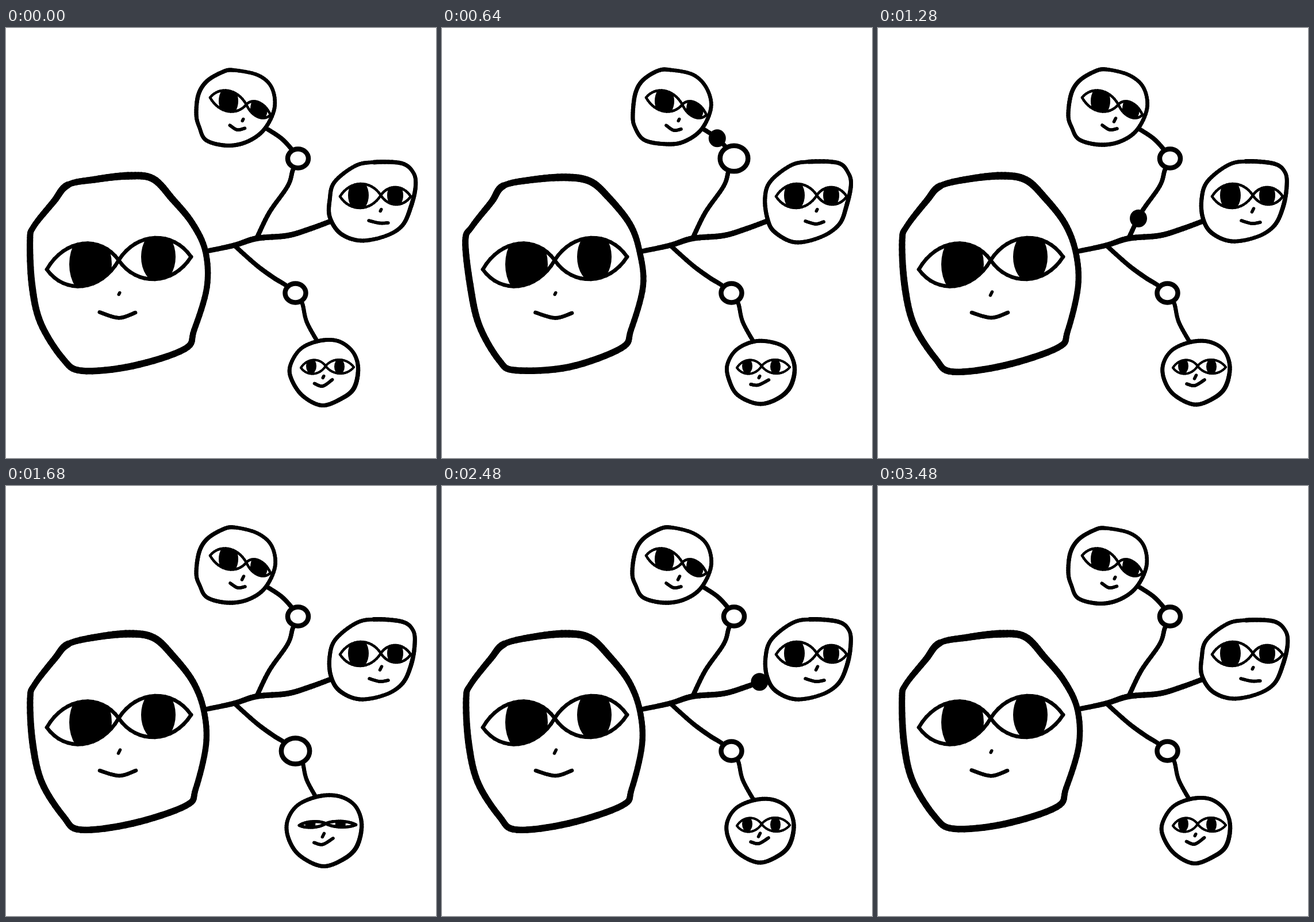
Animation, 748 px wide and 748 px high, one loop 3520 ms. Source, as an HTML page with a canvas:

```html
<!DOCTYPE html>
<html lang="en">
<head>
<meta charset="utf-8">
<title>Connected faces</title>
<style>
html, body { margin: 0; width: 100%; height: 100%; overflow: hidden; background: #fff; }
canvas { display: block; }
</style>
</head>
<body>
<canvas id="stage" width="748" height="748"></canvas>
<script>
const ctx = document.getElementById('stage').getContext('2d');
const LOOP = 3520, STEP = 40, HOLD = 160;
const WOBBLE = 'ABBBCBC'; // B is the steady drawing, A and C are shaky redraws

const pts = text => text.split(' ').map(p => p.split(',').map(Number));
const flip = a => [...a].reverse();
const lerp = (a, b, k) => a + (b - a) * k;

// seeded noise in -1..1
function noise(seed) {
  const v = Math.sin(seed * 127.1 + 31.7) * 43758.5453;
  return (v - Math.floor(v)) * 2 - 1;
}

function shake(line, look, amp, seed) {
  if (look === 'B') return line;
  const s = seed + look.charCodeAt(0) * 50;
  return line.map(([x, y], i) => [x + amp * noise(s + i), y + amp * noise(s + i + 25)]);
}

function spline(line, closed) {
  const n = line.length, out = [], K = 8;
  const at = i => closed ? line[(i + n) % n] : line[Math.max(0, Math.min(n - 1, i))];
  for (let i = 0; i < (closed ? n : n - 1); i++) {
    const a = at(i - 1), b = at(i), c = at(i + 1), d = at(i + 2);
    for (let k = 0; k < K; k++) {
      const t = k / K;
      out.push([0, 1].map(j => b[j] + t * (c[j] - a[j]) / 2
        + t * t * (a[j] - 2.5 * b[j] + 2 * c[j] - d[j] / 2)
        + t * t * t * (1.5 * (b[j] - c[j]) + (d[j] - a[j]) / 2)));
    }
  }
  out.push(closed ? out[0] : line[n - 1]);
  return out;
}

function fill(line, color) {
  ctx.fillStyle = color;
  ctx.beginPath();
  line.forEach(p => ctx.lineTo(...p));
  ctx.fill();
}

// brush stroke whose width swells and thins along the way
function ink(line, width, uneven = 0, seed = 0) {
  for (let i = 1; i < line.length; i++) {
    const k = Math.floor(i / 16), f = i / 16 - k;
    ctx.lineWidth = width * (1 + uneven * lerp(noise(seed + k), noise(seed + k + 1), f));
    ctx.beginPath();
    ctx.moveTo(...line[i - 1]);
    ctx.lineTo(...line[i]);
    ctx.stroke();
  }
}

function blob(x, y, rx, ry, color) {
  ctx.beginPath();
  ctx.ellipse(x, y, rx, ry, 0, 0, 7);
  ctx.fillStyle = color;
  ctx.fill();
}

// eyes: the two outer corners and the crossing; each pupil is [x, y, r]
const faces = [
  { mid: [195, 428], grow: .18, from: 3200, to: 3480, pen: 11.5,
    rim: pts('108,275 156,263 215,257 257,264 290,295 325,340 344,390 348,450 330,527 313,556 220,587 130,598 100,575 62,515 46,445 42,370 50,345 85,300'),
    corners: pts('71,420 196,404 322,398'), open: [37, 36], lidPen: 6.5,
    pupils: [[147, 411, 37], [265, 398, 30]],
    nose: [197, 462], mouth: pts('163,495 197,504 226,495') },
  { mid: [400, 137], grow: .33, from: 680, to: 949, pen: 7.3,
    rim: pts('397,72 437,82 462,104 468,140 450,178 420,198 385,203 350,194 337,173 331,152 336,115 350,92 376,76'),
    corners: pts('355,121 418,133 460,151'), open: [18, 13], lidPen: 4.5,
    pupils: [[387, 127, 17], [440, 141, 15]],
    nose: [412, 160], mouth: pts('390,169 403,177 416,175') },
  { mid: [638, 302], grow: .25, from: 2500, to: 2800, pen: 7.5,
    rim: pts('640,232 689,236 708,251 711,275 705,310 690,343 660,363 615,371 580,356 565,330 563,297 573,267 608,239'),
    corners: pts('581,293 652,291 704,293'), open: [21, 15], lidPen: 4.5,
    pupils: [[613, 291, 18], [677, 291, 14]],
    nose: [652, 317], mouth: pts('632,335 650,340 665,338') },
  { mid: [554, 600], grow: .37, from: 1652, to: 1930, pen: 7.5,
    rim: pts('545,546 577,546 602,561 612,590 604,625 582,645 550,655 515,638 498,612 496,585 512,560'),
    corners: pts('513,591 556,588 605,590'), open: [12, 12], lidPen: 4,
    pupils: [[531, 588, 9], [580, 589, 9]],
    nose: [552, 607], mouth: pts('537,619 551,622 568,612') }
];

// one trunk with a fork down and a fork up; a ring sits on each fork
const home = [345, 389];
const trunk = pts('345,389 397,378 436,366 490,361 530,349 565,336');
const up = pts('436,366 458,321 490,275 499,247 508,227 497,211 479,192 455,176');
const down = pts('397,378 435,412 465,434 486,447 503,461 515,478 523,511 542,546');
const rings = [[508, 227], [503.5, 461]];
const hops = [
  { from: 120, to: 690, path: [...trunk.slice(0, 3), ...up] },
  { from: 980, to: 1760, path: [...flip(up), ...down] },
  { from: 1900, to: 2500, path: [...flip(down), ...trunk.slice(1)] },
  { from: 2828, to: 3200, path: flip(trunk) }
];

function along(path, f) {
  const len = path.map((p, i) => i ? Math.hypot(p[0] - path[i - 1][0], p[1] - path[i - 1][1]) : 0);
  let rest = f * len.reduce((a, b) => a + b);
  for (let i = 1; i < path.length; i++) {
    if (len[i] && rest <= len[i]) return [0, 1].map(j => lerp(path[i - 1][j], path[i][j], rest / len[i]));
    rest -= len[i];
  }
  return path[path.length - 1];
}

const swell = (face, t) => t <= face.from || t >= face.to ? 0
  : Math.sin(Math.PI * (t - face.from) / (face.to - face.from));

// lens from a to b and back; the two lenses meet in a smooth figure eight
function lens(a, b, h) {
  const side = (p, q, s) => Array.from({ length: 17 }, (_, i) => {
    const u = i / 16;
    return [lerp(p[0], q[0], .75 * u + .75 * u * u - .5 * u * u * u),
            lerp(p[1], q[1], u) + s * h * 4 * u * (1 - u)];
  });
  return [...side(a, b, -1), ...side(b, a, 1)];
}

function drawEyes(face, scaled, blink) {
  const pen = face.lidPen * (1 + .3 * blink);
  face.open.forEach((open, i) => {
    const [a, b] = face.corners.slice(i, i + 2).map(scaled);
    const shape = lens(a, b, open * (1 - .58 * blink));
    const [x, y, r] = face.pupils[i];
    ctx.save();
    ctx.beginPath();
    shape.forEach(p => ctx.lineTo(...p));
    ctx.clip();
    blob(...scaled([x, y]), r, r * 1.5, '#000');
    ctx.restore();
    ink(shape, pen);
  });
}

function drawFace(face, i, look, t) {
  const g = swell(face, t), size = 1 + face.grow * g;
  const about = k => p => [0, 1].map(j => lerp(face.mid[j], p[j], k));
  const inner = about(lerp(1, size, .6));

  const rim = spline(shake(face.rim, look, face.pen * .25, i * 60).map(about(size)), true);
  fill(rim, '#fff');
  ink(rim, face.pen, .15, i * 20);
  drawEyes(face, inner, Math.min(1, g * 3.3));

  const [x, y] = inner(face.nose), tick = look === 'B' ? 3 : 1.5;
  ink([[x + tick / 2, y - tick], [x - tick / 2, y + tick]], 5.5);
  ink(spline(shake(face.mouth, look, 1, i).map(inner)), face.pen * .25 + 3.7);
}

function draw(t) {
  const look = WOBBLE[Math.floor(t / HOLD) % WOBBLE.length];
  ctx.fillStyle = '#fff';
  ctx.fillRect(0, 0, 748, 748);
  ctx.strokeStyle = '#000';
  ctx.lineCap = ctx.lineJoin = 'round';

  [trunk, up, down].forEach((line, i) => ink(spline(line), i ? 7.8 : 9, .12, i * 9));

  const hop = hops.find(h => t >= h.from && t < h.to);
  const dot = hop && along(hop.path, (t - hop.from) / (hop.to - hop.from));
  let hidden = !dot || faces.some(f => swell(f, t) > 0);
  for (const [x, y] of rings) {
    const d = dot ? Math.hypot(dot[0] - x, dot[1] - y) : 999;
    const k = 1 + .6 * Math.max(0, 1 - d / 110);
    if (d < 30) hidden = true;
    blob(x, y, 18 * k, 16.5 * k, '#fff');
    ctx.lineWidth = 8.5;
    ctx.stroke();
  }
  if (!hidden) blob(...dot, 15, 15.5, '#000');
  faces.forEach((f, i) => drawFace(f, i, look, t));
}

const start = performance.now();
function tick() {
  const t = (performance.now() - start) % LOOP;
  draw(Math.floor(t / STEP) * STEP);
  requestAnimationFrame(tick);
}
tick();
</script>
</body>
</html>
```
